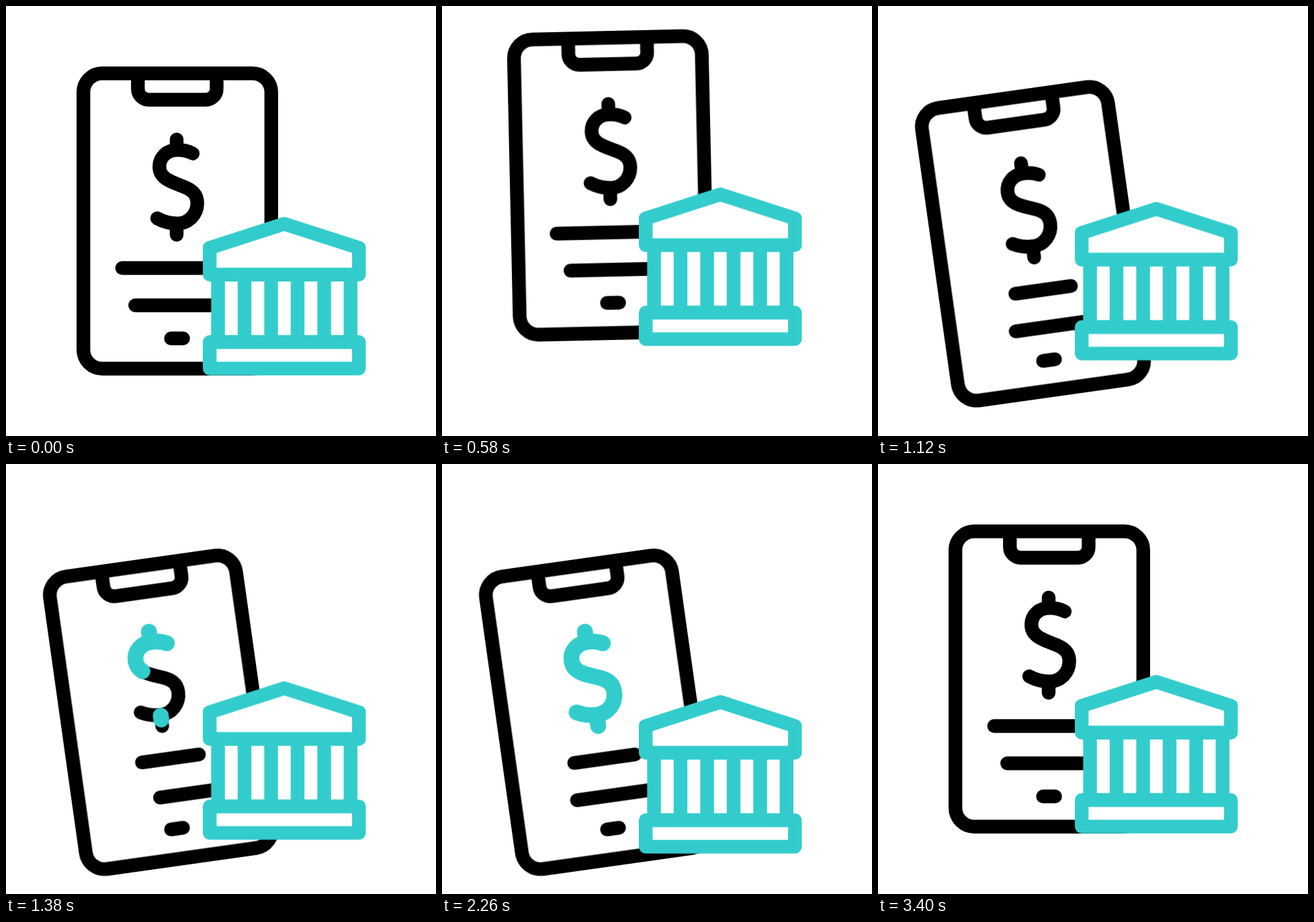
Recreate the animation shown at these times as an HTML page. Size 640 px wide and 640 px high, loop 3600 ms.

```html
<!DOCTYPE html>
<html lang="en">
<head>
<meta charset="utf-8">
<title>Mobile banking</title>
<style>
  html, body { margin: 0; width: 100%; height: 100%; overflow: hidden; background: #fff; }
  svg {
    display: block; width: 100vw; height: 100vh;
    fill: none; stroke: #000; stroke-width: 20.4; stroke-linecap: round; stroke-linejoin: round;
  }

  .lift, .tilt, .bank, .line, .glow {
    animation: 3600ms cubic-bezier(.333, 0, .667, 1) infinite;
  }
  .lift { animation-name: lift; }
  .tilt { animation-name: tilt; transform-origin: 254px 495px; }
  .bank { animation-name: bank; stroke: #33cccc; fill: #fff; }

  .line { stroke-dasharray: 130 300; }
  .first { animation-name: first; }
  .second { animation-name: second; }

  .glow { animation-name: glow; stroke: #33cccc; stroke-width: 23.6; stroke-dasharray: 1 3; }

  @keyframes lift {
    0%, 5% { transform: translateY(0); }
    16.11% { transform: translateY(-53px); }
    36.11%, 80.83% { transform: translateY(48px); }
    94.44%, 100% { transform: translateY(0); }
  }
  @keyframes tilt {
    0%, 11.39% { transform: rotate(0deg); }
    30.28%, 82.22% { transform: rotate(-8deg); }
    94.44%, 100% { transform: rotate(0deg); }
  }
  @keyframes bank {
    0%, 5% { transform: translateY(0); }
    20% { transform: translateY(-52.5px); }
    47.22%, 75.56% { transform: translateY(30px); }
    94.44%, 100% { transform: translateY(0); }
  }
  @keyframes first {
    0%, 18.33% { stroke-dashoffset: 0; }
    34.44% { stroke-dashoffset: 52; }
    50.56%, 51.67% { stroke-dashoffset: 0; }
    68.33% { stroke-dashoffset: 52; }
    85%, 100% { stroke-dashoffset: 0; }
  }
  @keyframes second {
    0%, 23.89% { stroke-dashoffset: 0; }
    40% { stroke-dashoffset: 45; }
    56.11% { stroke-dashoffset: 0; }
    73.33% { stroke-dashoffset: 45; }
    91.11%, 100% { stroke-dashoffset: 0; }
  }
  /* Draws on, then wipes off from the same end; the rest of the cycle stays in the dash gap. */
  @keyframes glow {
    0%, 32.78% { stroke-dashoffset: 1.02; }
    46.11%, 63.33% { stroke-dashoffset: 0; }
    78.89% { stroke-dashoffset: -1.02; }
    100% { stroke-dashoffset: -2.98; }
  }
</style>
</head>
<body>
<svg viewBox="0 0 640 640">
  <defs>
    <g id="dollar">
      <path pathLength="1" d="M254 198.7V213"/>
      <path pathLength="1" d="M278 219.5C271 216 264 214.3 256 214.3C239 214.3 228.3 225 228.3 239C228.3 256 244 261 262 268C277 273.5 284.7 280 284.7 293.5C284.7 311 271 323.7 255 323.7C243 323.7 235 321.5 225 316"/>
      <path pathLength="1" d="M254 325V340.5"/>
    </g>
  </defs>

  <g class="lift">
    <g class="tilt">
      <rect x="115.2" y="100.2" width="279.6" height="439.5" rx="28"/>
      <path d="M196.3 100.2V123.5a16 16 0 0 0 16 16H297.5a16 16 0 0 0 16-16V100.2"/>
      <use href="#dollar"/>
      <use href="#dollar" class="glow"/>
      <path class="line first" d="M302.3 390H172.8"/>
      <path class="line second" d="M322.3 445.5H192.3"/>
      <path d="M245.6 494.8H263.6"/>
    </g>
  </g>

  <g class="bank">
    <path d="M315.6 399.8H512.8V500H315.6ZM355 399.8V500M394.6 399.8V500M434 399.8V500M473.6 399.8V500"/>
    <path d="M303.2 360L414.2 324.3L525.3 360V399.8H303.2Z"/>
    <path d="M303.2 500.2H525.3V539.6H303.2Z"/>
  </g>
</svg>
</body>
</html>
```
